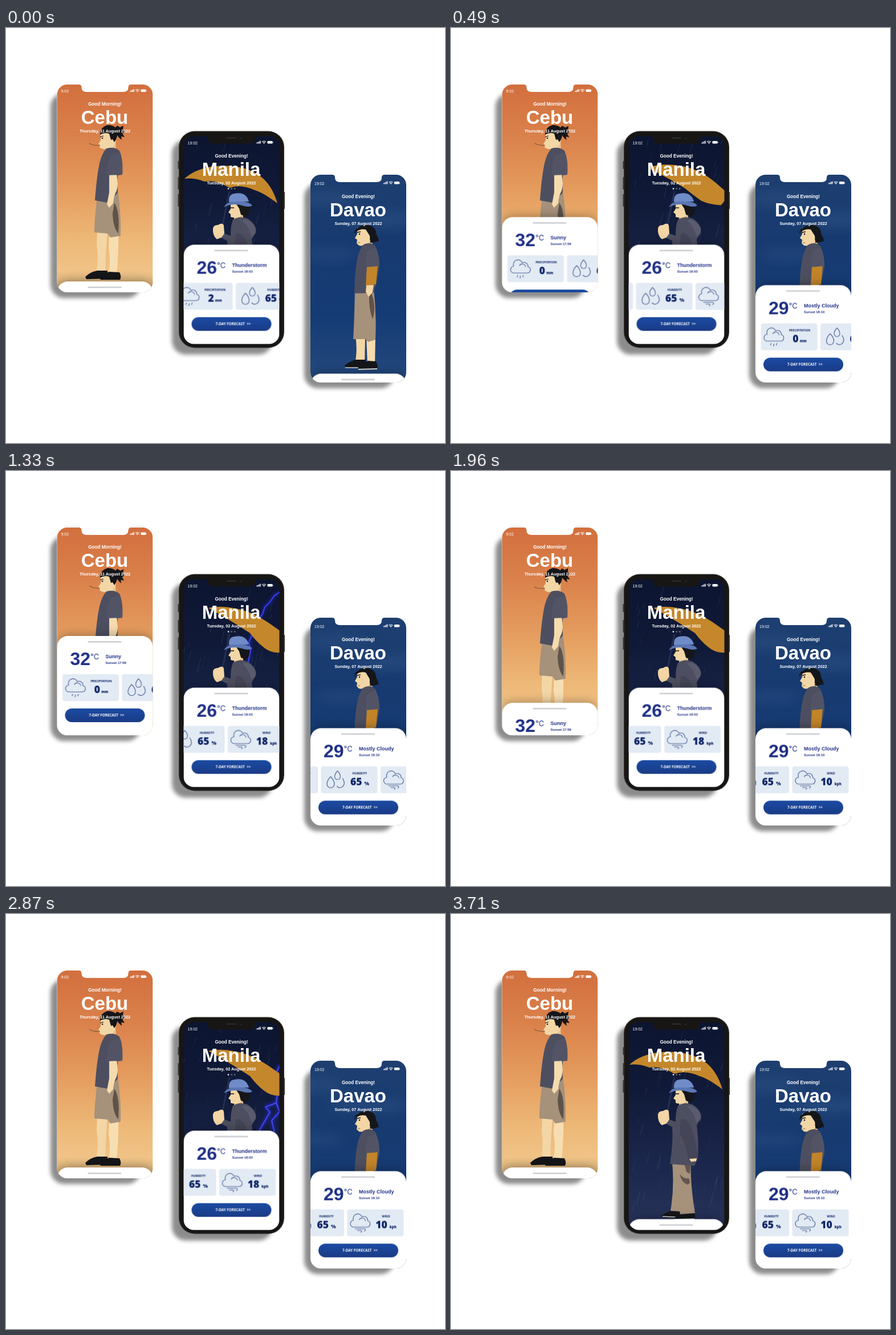
Animation of 770x727 px, one loop 3780 ms. Source, as an HTML page:

```html
<!DOCTYPE html>
<html lang="en">
<head>
<meta charset="utf-8">
<title>Weather app</title>
<style>
html, body { margin: 0; width: 100%; height: 100%; overflow: hidden; background: #fff }
svg { display: block }
text { font-family: "Liberation Sans", Arial, sans-serif; font-weight: 700; white-space: pre }
.mid { text-anchor: middle }
.card text { font-family: "Open Sans", sans-serif; fill: #0b2265; text-anchor: middle }
.card .value { font-weight: 800 }
.icon { fill: none; stroke: #4a6192; stroke-width: 1.15; stroke-linecap: round; stroke-linejoin: round }
.sheet { filter: drop-shadow(0 -3px 8px #0004) }
.bolt { fill: none; stroke-linejoin: bevel; filter: drop-shadow(0 0 3px #33f) }
</style>
</head>
<body>
<script>
const LOOP = 3780, STEP = 70, SWIPE = 420, UP = 190, DOWN = 345;
const SKIN = '#f3d6a5', INK = '#151619', SHIRT = '#4d4f60', PANTS = '#a6917b', NAVY = '#1e2f86';

const shape = (d, fill, more = '') => `<path d="${d}" fill="${fill}" ${more}/>`;
const line = (d, stroke, width, more = '') => shape(d, 'none', `stroke="${stroke}" stroke-width="${width}" ${more}`);
const box = (x, y, w, h, r, fill, more = '') =>
  `<rect x="${x}" y="${y}" width="${w}" height="${h}" rx="${r}" fill="${fill}" ${more}/>`;
const text = (x, y, size, s, more = '') => `<text x="${x}" y="${y}" font-size="${size}" ${more}>${s}</text>`;
const gradient = (id, ...stops) => `<linearGradient id="${id}" x2="0" y2="1">${stops.map((c, i) =>
  `<stop offset="${i / (stops.length - 1)}" stop-color="${c}"/>`).join('')}</linearGradient>`;

let seed = 7;
const random = () => (seed = seed * 16807 % 2147483647) / 2147483647;

// Screen outline with its notch
const outline = (x, y) => `M${x + 18} ${y}h20q5 0 5 5q0 8 9 8h64q9 0 9-8q0-5 5-5h20a18 18 0 0 1 18 18
  v328a18 18 0 0 1-18 18h-132a18 18 0 0 1-18-18v-328a18 18 0 0 1 18-18z`;

const cloud = 'M13 31h-1a6 6 0 0 1-1-12a8 8 0 0 1 15-6a7 7 0 0 1 10 7a5.6 5.6 0 0 1-1 11h-2M21 18a6 6 0 0 1 11 2';
const drop = (x, y, r) => `M${x} ${y - 2 * r}q${r} ${r} ${r} ${2 * r}a${r} ${r} 0 0 1${-2 * r} 0q0${-r} ${r}${-2 * r}z`;
const icons = [
  cloud + 'M13 31h20M18 35l-1 3M23 36l-1 4M28 35l-1 3',
  drop(29, 18, 5) + drop(17, 31, 6.5) + 'M38 21q6 10-1 15q-5 3-9-1',
  cloud + 'M13 31h22M14 34h16q4 2 0 4M18 37h6q3 2 0 3'
];

function card(i, value) {
  const unit = ['mm', '%', 'kph'][i];
  return `<g class="card" transform="translate(${i * 104.5})">` +
    box(0, 0, 99, 47, 4, '#e2eaf4') + `<path class="icon" d="${icons[i]}"/>` +
    text(68, 13.5, 5, ['PRECIPITATION', 'HUMIDITY', 'WIND'][i]) +
    `<text class="value" x="68" y="33" font-size="17.5">${value}` +
    `<tspan dx="${i ? 4 : 2}" font-size="${i == 1 ? 9 : 6}">${unit}</tspan></text></g>`;
}

const status = shape('M128 13v-2h1.3v2zM130 13v-3h1.3v3zM132 13v-4h1.3v4zM134 13v-5h1.3v5z', '#fff') +
  line('M137.5 10q3.5-3 7 0M139 11.5q2-1.6 4 0', '#fff', 1.1) + '<circle cx="141" cy="12.6" r=".8" fill="#fff"/>' +
  box(147, 8.5, 9, 4.6, 1.3, '#fff') + box(156.4, 10, .8, 1.8, .4, '#fff');

function screen(i, p) {
  return `<clipPath id="clip${i}"><path d="${outline(p.x, p.y)}"/></clipPath><g clip-path="url(#clip${i})">` +
    box(p.x, p.y, 168, 364, 0, `url(#sky${i})`) + p.scene +
    `<g transform="translate(${p.x} ${p.y + (p.dy || 0)})"><g fill="#fff">` +
    text(7, 14, 7, p.time, 'style="font-weight:400"') + status +
    text(84, 37, 8.2, p.greeting, 'class="mid"') + text(83.5, 69, 33, p.city, 'class="mid"') +
    text(84, 84, 7.3, p.date, 'class="mid"') + (p.extra || '') + '</g>' +
    `<g class="sheet" id="sheet${i}">` + box(0, 0, 168, 400, 19, '#fff') + box(54, 9, 59, 2.4, 1.2, '#cbcdd2') +
    `<g fill="${NAVY}">` + text(23, 51, 32, p.temp) +
    text(58.5, 41, 13, '°C', 'style="font-family:Inter,sans-serif;font-weight:400"') +
    text(85, 39, 9, p.sky) + text(85, 49, 5.9, 'Sunset ' + p.sunset) + '</g>' +
    `<g id="cards${i}">` + p.values.map((v, k) => card(k, v)).join('') + '</g>' +
    box(14, 127, 140, 24, 12, 'url(#button)') +
    text(87, 141.3, 6.3, '7-DAY FORECAST  &gt;&gt;', 'class="mid" fill="#fff" style="font-family:Open Sans,sans-serif"') +
    '</g></g></g>';
}

const shadow = (x, y, w, h) => box(x, y, w, h, 24, '#666', 'opacity=".75" filter="url(#soft)"');

const walker = box(89, 425, 170, 40, 0, 'url(#sand)') +
  shape('M160 352L178 356L175 400L174 430L158 430Q163 405 159 380z', SKIN) +
  shape('M181 358L197 358Q198 390 194 432L180 432Q184 405 180 385z', '#f7deb2') +
  shape('M139 436Q148 427 160 425L178 425L179 439L141 440z', INK) +
  shape('M164 438Q174 430 181 427L199 428Q203 435 200 441L166 441z', INK) +
  shape('M160 296L197 290Q202 330 201 364L183 367L178 360L155 358Q155 335 160 296z', PANTS) +
  shape('M190 306Q200 320 197 360Q188 350 187 325z', '#5f5348') +
  shape('M176 196L192 193L193 217L177 217z', '#e8c38f') +
  shape('M166 181Q182 173 192 187Q195 203 185 210Q172 215 164 209L165 205L162 203L166 197z', SKIN) +
  `<g id="bun">` + shape('M190 176L195 171L200 174L206 171L205 178L209 181L204 185L208 191L202 190L203 196Q196 191 193 184z', INK) + '</g>' +
  shape('M165 187Q165 174 178 170Q191 169 196 180Q196 192 190 200L187 195L184 196L181 185Q172 182 165 187z', INK) +
  line('M165 191l6-2', INK, 1.2) + '<circle cx="169" cy="193" r="1.3" fill="#151619"/>' +
  line('M164 206L154 205Q149 204 146 202', '#745936', 1.1, 'id="twig"') +
  shape('M176 211Q190 207 199 215Q206 230 204 257L196 258L196 289L178 306L156 302Q159 260 164 237Q168 220 176 211z', SHIRT) +
  shape('M181 255L194 256Q198 275 194 285Q189 294 188 307L181 315L177 309L181 288z', '#f5dbad') +
  shape('M183 223Q176 240 177 258L204 257Q205 235 199 218z', '#525466');

const raindrops = Array.from({ length: 90 }, () => ({
  x: 300 + random() * 260, y: random() * 400, len: 8 + random() * 18, laps: 2 + Math.floor(random() * 4),
  alpha: .04 + random() * .12
}));
const bolts = [
  ['M480 192L471 207L468 214L473 220L469 231L456 238L452 250L444 260L440 280L428 296L431 315L418 345L382 358L371 363L378 371L374 384', 2.4, 700, 980],
  ['M482 211L470 219L462 231L454 238L450 250L440 266L426 300L429 314L424 340', 1.4, 1260, 1470],
  ['M481 264L473 280L478 300L474 331L455 338L463 347L444 380M474 331L480 346L466 362L471 382', 2, 2800, 3010]
];
const umbrella = [
  'M313 264C340 238 400 234 436 253C457 264 470 285 476 307C462 297 450 288 436 284Q412 273 392 280Q368 265 348 269Q330 262 313 264',
  'M355 240C375 235 405 239 430 249C452 258 468 272 490 286C490 298 488 308 484 318Q465 320 452 309Q440 300 428 284Q395 262 355 240'
];
const rainer = `<g id="rain" stroke="#cbd8ff" stroke-width=".8"></g>` +
  bolts.map(([d, w], i) => `<g class="bolt" id="bolt${i}">${line(d, '#2a2eff', w + 1.3)}${line(d, '#9a9cff', w / 3)}</g>`).join('') +
  shape('', '#c4872b', 'id="umbrella"') + line('M392 286L376 364', '#252e52', 3) +
  shape('M369 529Q382 518 404 517L407 531L372 532z', INK) + line('M371 530L400 531', '#ddd', 1.4) +
  shape('M391 532Q403 523 426 522Q430 529 427 534L393 536z', INK) + line('M391 535L427 534', '#ddd', 1.5) +
  shape('M388 435L421 432Q419 470 428 524L402 526L401 521L385 520Q392 480 388 435z', PANTS) +
  shape('M408 432L421 432L419 455L413 452zM401 455Q408 465 417 463Q422 473 414 474Q404 470 401 455z', '#62574d') +
  shape('M400 322L416 322L416 342L400 342z', '#dcb987') +
  shape('M394 308L415 308L416 326Q408 335 394 331L394 326L390 323L394 317z', SKIN) +
  shape('M403 307L426 308Q430 324 421 330L412 327L409 316z', INK) + line('M394 315l6 0', INK, 1.4) +
  shape('M391 305Q390 291 401 290Q421 286 426 304z', '#6f8bc8') +
  shape('M382 314Q388 303 402 304Q426 302 432 311Q426 315 414 311Q398 306 382 314z', '#5b77b5') +
  shape('M398 336Q410 328 424 334Q441 345 438 359L431 370Q435 400 433 427L427 441L384 438Q390 400 388 373L377 367L383 360L394 364Q394 345 398 336z', SHIRT) +
  shape('M414 337Q428 332 438 352Q439 361 430 365Q428 350 414 337z', '#5a5c6d') +
  shape('M403 360Q411 356 420 370Q432 400 433 427L416 430Q412 400 401 385z', '#444657') +
  shape('M363 351Q364 345 372 345Q380 340 382 346L383 360L378 367L370 370Q362 364 363 351z', SKIN) +
  shape('M418 429L431 428L430 433L421 434z', SKIN);

const breezy = `<g id="clouds" fill="#5b83b8" filter="url(#haze)" opacity=".22">
  <ellipse cx="560" cy="300" rx="60" ry="9"/><ellipse cx="660" cy="335" rx="70" ry="11"/><ellipse cx="570" cy="395" rx="50" ry="8"/></g>` +
  shape('M613 540L630 543L629 590L612 588Q617 565 613 540z', SKIN) +
  shape('M632 540L648 540L647 590L634 590z', '#f5dbad') +
  shape('M594 591Q603 584 613 581L631 581L631 594L596 596z', INK) + line('M595 595L630 595', '#ddd', 1.5) +
  shape('M617 593Q626 587 635 583L649 584Q653 591 651 597L619 599z', INK) + line('M618 598L651 597', '#ddd', 1.8) +
  shape('M612 458L645 458Q650 500 648 546L635 550L631 545L609 545Q611 510 612 458z', PANTS) +
  shape('M641 464Q650 490 643 510Q636 490 637 470z', '#5f5348') +
  shape('M626 368L642 366L643 384L627 384z', '#e0bb88') +
  shape('M616 350L636 348L641 370Q632 384 619 381L615 377L616 371L612 368L616 361z', SKIN) +
  `<g id="hair">` + shape('M613 354Q621 344 635 345Q649 348 649 360L654 371Q648 377 639 376L638 364L631 353Q622 351 614 357z', INK) +
  line('M638 370Q648 370 654 374M616 352Q612 354 612 360', INK, 1.6) + '</g>' +
  line('M616 358l6-1', INK, 1.3) + '<circle cx="620" cy="361" r="1.3" fill="#151619"/>' +
  line('M617 376h4', '#94663f', 1) +
  shape('M626 380Q638 373 648 382Q655 400 655 418L649 450L644 464L611 465Q612 420 617 401Q620 388 626 380z', SHIRT) +
  shape('M633 417L652 416L649 449L631 452z', '#c28429') +
  shape('M632 451L645 450L643 463L636 471L631 462z', SKIN) +
  shape('M634 391Q630 405 631 419L655 417Q655 395 648 384z', '#525465');

const bezel = box(301.6, 233, 3, 14, 1, '#333') + box(301.6, 261, 3, 22, 1, '#333') + box(301.6, 291, 3, 22, 1, '#333') +
  box(486, 287, 3, 30, 1, '#333') + box(303, 180.5, 185, 380, 28, '#35332f') + box(304.2, 181.7, 182.6, 377.6, 27, '#171615') +
  box(387, 191.5, 17, 2.4, 1.2, '#2c2b2a') + '<circle cx="412" cy="193.5" r="2" fill="#20232e"/>';

const phones = [
  { x: 89.5, y: 99, scene: walker, time: '9:02', greeting: 'Good Morning!', city: 'Cebu', date: 'Thursday, 11 August 2022',
    temp: 32, sky: 'Sunny', sunset: '17:59', values: [0, 65, 10] },
  { x: 311.5, y: 189.5, scene: rainer, time: '19:02', greeting: 'Good Evening!', city: 'Manila', date: 'Tuesday, 02 August 2022',
    temp: 26, sky: 'Thunderstorm', sunset: '18:03', values: [2, 65, 18],
    extra: [1, .4, .4].map((a, i) => `<circle cx="${78.5 + i * 5.6}" cy="92" r="1.3" opacity="${a}"/>`).join('') },
  { x: 534, y: 257, dy: 3.5, scene: breezy, time: '19:02', greeting: 'Good Evening!', city: 'Davao', date: 'Sunday, 07 August 2022',
    temp: 29, sky: 'Mostly Cloudy', sunset: '18:10', values: [0, 65, 10] }
];

document.body.innerHTML = `<svg width="770" height="727" viewBox="0 0 770 727"><defs>` +
  gradient('sky0', '#d26f3e', '#da814b', '#e49b5d', '#edb877', '#f2ca90') +
  gradient('sky1', '#0c1530', '#101a38', '#1b264c', '#28335a') +
  gradient('sky2', '#1e3f70', '#173a70', '#153b75', '#24497d') +
  gradient('sand', '#d9b27a00', '#b4945f') + gradient('button', '#1b4ba3', '#1a3b86') +
  `<filter id="soft" x="-20%" y="-20%" width="140%" height="140%"><feGaussianBlur stdDeviation="3.5"/></filter>
  <filter id="haze" x="-50%" y="-50%" width="200%" height="200%"><feGaussianBlur stdDeviation="11"/></filter></defs>` +
  shadow(78, 114, 158, 359) + shadow(291, 196, 176, 376) + shadow(523, 272, 158, 359) + bezel +
  box(89.5, 99, 168, 364, 18, '#fff') + box(534, 257, 168, 364, 18, '#fff') +
  phones.map((p, i) => screen(i, p)).join('') + '</svg>';

const set = (id, name, value) => document.getElementById(id).setAttribute(name, value);

function ease(t, start) {
  const p = Math.min(1, Math.max(0, (t - start) / SWIPE));
  return p < .5 ? 2 * p * p : 1 - 2 * (1 - p) ** 2;
}

function blend(a, b, k) {
  const to = b.match(/\d+/g);
  let i = 0;
  return a.replace(/\d+/g, n => (+n + (to[i++] - n) * k).toFixed(1));
}

function draw(t) {
  const lowered = [1 - ease(t, 225) + ease(t, 1687), ease(t, 3060), 1 - ease(t, 0)];
  const scrolled = [0, 101 * ease(t, -140) + 55 * ease(t, 1065), 95.5 * ease(t, 630) + 58.5 * ease(t, 1470)];
  phones.forEach((_, i) => {
    set('sheet' + i, 'transform', `translate(0 ${UP + (DOWN - UP) * lowered[i]})`);
    set('cards' + i, 'transform', `translate(${9.5 - scrolled[i]} 67)`);
  });

  const sway = t < 3402 ? Math.sin(t / 1134 * 2 * Math.PI) : 0;
  set('bun', 'transform', `rotate(${4 * sway} 190 180)`);
  set('twig', 'transform', `rotate(${3 * sway} 164 206)`);
  set('hair', 'transform', `rotate(${2 * Math.sin(t / LOOP * 8 * Math.PI)} 634 350)`);
  set('clouds', 'transform', `translate(${24 * Math.sin(t / LOOP * 2 * Math.PI)})`);

  set('umbrella', 'd', blend(...umbrella, ease(t, 210) - ease(t, 3080)));
  bolts.forEach(([, , from, to], i) =>
    set('bolt' + i, 'opacity', t >= from && t < to ? 1 - .6 * (t - from) / (to - from) : 0));
  document.getElementById('rain').innerHTML = raindrops.map(r => {
    const y = (r.y + 400 * r.laps * t / LOOP) % 400;
    return `<path d="M${r.x - y * .25} ${170 + y}l${-r.len / 4} ${r.len}" opacity="${r.alpha}"/>`;
  }).join('');
}

function tick() {
  draw(Math.floor(performance.now() % LOOP / STEP) * STEP);
  requestAnimationFrame(tick);
}
tick();
</script>
</body>
</html>
```
